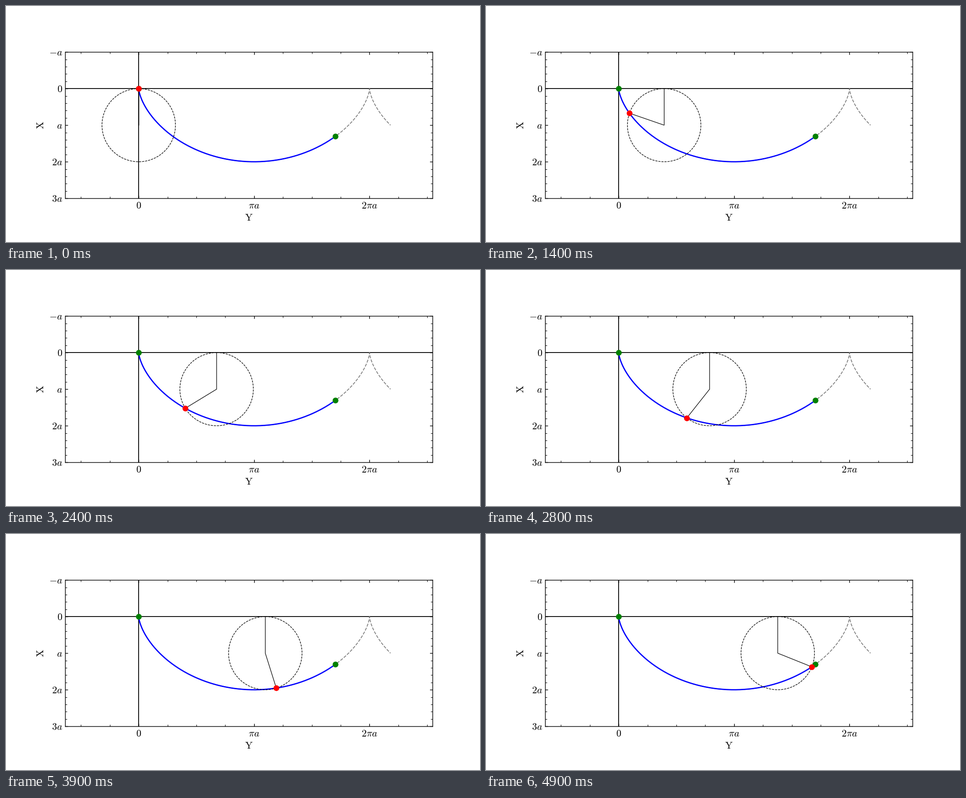
Animation of 1058 by 529 pixels, one loop 5000 ms. Source, as a matplotlib script:

```python
import numpy as np
import matplotlib.pyplot as plt
from matplotlib.animation import FuncAnimation
from matplotlib.ticker import AutoMinorLocator, MultipleLocator

FRAMES, INTERVAL = 50, 100
STEP = 0.08835          # rolling angle per frame
END = 1.4 * np.pi       # angle at the lower end of the track

plt.rcParams.update({
    "font.size": 12,
    "mathtext.fontset": "cm",
    "xtick.direction": "in",
    "ytick.direction": "in",
    "xtick.top": True,
    "ytick.right": True,
})


def cycloid(t):
    return t - np.sin(t), 1 - np.cos(t)


fig, ax = plt.subplots(figsize=(8, 4), dpi=132.25)
ax.set_aspect("equal")
ax.set_xlim(-2, 8)
ax.set_ylim(3, -1)
ax.set_xticks([0, np.pi, 2 * np.pi], ["$0$", r"$\pi a$", r"$2\pi a$"])
ax.set_yticks([-1, 0, 1, 2, 3], ["$-a$", "$0$", "$a$", "$2a$", "$3a$"])
ax.xaxis.set_minor_locator(MultipleLocator(np.pi / 4))
ax.yaxis.set_minor_locator(AutoMinorLocator(5))
ax.set_xlabel(r"$\mathrm{Y}$")
ax.set_ylabel(r"$\mathrm{X}$")

ax.axhline(0, color="black", lw=1)
ax.axvline(0, color="black", lw=1)
ax.plot(*cycloid(np.linspace(0, 2.5 * np.pi, 500)), "--", color="gray", lw=1)
ax.plot(*cycloid(np.linspace(0, END, 300)), color="blue", lw=1.5)

turn = np.linspace(0, 2 * np.pi, 200)
wheel, = ax.plot([], [], "--", color="black", lw=0.7)
spokes, = ax.plot([], [], color="black", lw=0.7)
ax.plot(*cycloid(np.array([0, END])), "o", color="green")
bead, = ax.plot([], [], "o", color="red")


def update(i):
    t = i * STEP
    x, y = cycloid(t)
    wheel.set_data(t + np.sin(turn), 1 - np.cos(turn))
    spokes.set_data([t, t, x], [0, 1, y])
    bead.set_data([x], [y])
    return wheel, spokes, bead


anim = FuncAnimation(fig, update, frames=FRAMES, interval=INTERVAL,
                     repeat=True, repeat_delay=0)
plt.show()
```
